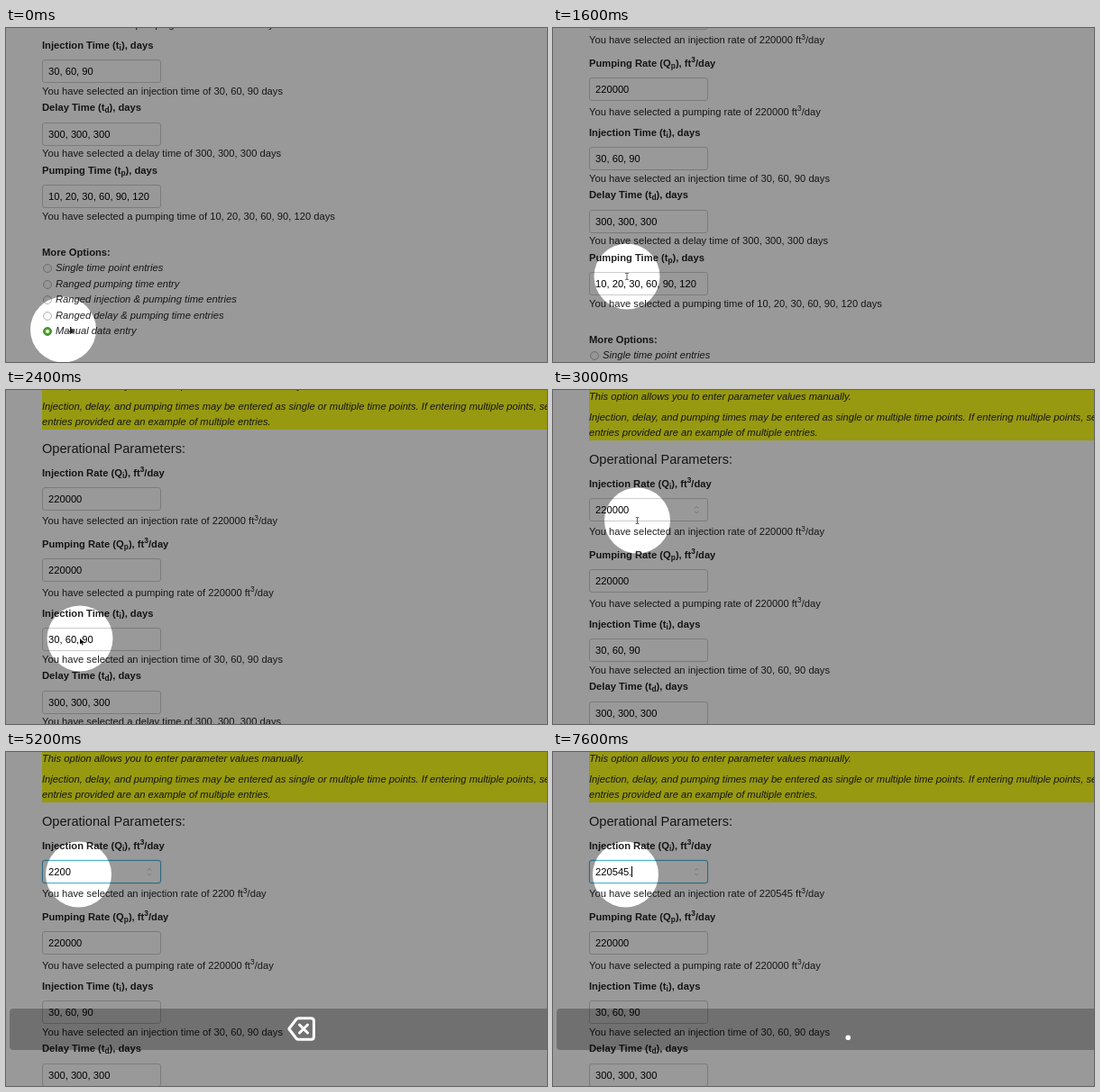
Animation of 600 by 371 pixels, one loop 8000 ms. Source, as an HTML page:

```html
<!DOCTYPE html>
<html lang="en">
<head>
<meta charset="utf-8">
<title>Parameter entry</title>
<style>
html, body { margin: 0; width: 100%; height: 100%; overflow: hidden; background: #fff; }
#stage {
  position: relative; width: 600px; height: 371px; overflow: hidden;
  font: 11.2px/16px "Liberation Sans", Arial, sans-serif; color: #222;
}
#stage div, #stage svg { position: absolute; }
#page { left: 0; top: 0; width: 600px; height: 600px; }
.row { left: 40px; white-space: nowrap; }
.bold { font-weight: bold; }
.em { font-style: italic; }
.head { font-size: 14.6px; }
.option { left: 55px; font-style: italic; }
sub, sup { font-size: 75%; line-height: 0; position: relative; vertical-align: baseline; }
sub { bottom: -.25em; }
sup { top: -.5em; }
#banner { left: 40px; top: -40px; width: 560px; height: 96px; background: #fbff1c; }
.field {
  left: 40px; width: 124px; height: 24px; padding-left: 6px; line-height: 24px;
  border: 1px solid #ccc; border-radius: 3px; background: #fff; color: #000; white-space: nowrap;
}
.field.focus { border-color: #48b2d4; box-shadow: 0 0 2px #9bd6ea; }
#caret { display: inline-block; width: 1px; height: 12px; background: #000; vertical-align: -2px; }
.radio {
  left: 41px; width: 8px; height: 8px; border: 1px solid #b5b5b5; border-radius: 50%;
  background: radial-gradient(#fff, #eee);
}
.radio.on { border-color: #3f8f25; background: radial-gradient(circle, #fff 1.6px, #48a02c 2.3px); }
#spot { width: 73px; height: 73px; border-radius: 50%; box-shadow: 0 0 0 900px rgba(0, 0, 0, .4); }
#bar { left: 4px; top: 285px; width: 610px; height: 46px; border-radius: 4px; background: rgba(0, 0, 0, .27); }
#art { left: 0; top: 0; }
#digit { font: 28px Lato, "Open Sans", sans-serif; text-anchor: middle; fill: #fff; }
</style>
</head>
<body>
<div id="stage">
  <div id="page"><div id="banner"></div></div>
  <div id="spot"></div>
  <div id="bar"></div>
  <svg id="art" width="600" height="371" fill="none">
    <g id="spinner" stroke="#777" stroke-width="1">
      <path d="M157.3 131.5l2-2.2 2 2.2M157.3 134.8l2 2.2 2-2.2"/>
    </g>
    <g id="pointer">
      <path id="hand" d="M-1-3h1.4v2.6l2.4.8v2.2l-1 1.6h-2.6l-1.8-2.6 1.6-.2z" fill="#222"/>
      <path id="arrow" d="M0 0v6.4l1.5-1.3 1 2.3 1.1-.5-1-2.2 2-.1z" fill="#000"/>
      <path id="ibeam" d="M-1.8-3.5h1.4l.4.5.4-.5h1.4M0-3v6M-1.8 3.5h1.4l.4-.5.4.5h1.4" stroke="#444" stroke-width=".9"/>
    </g>
    <g id="erase" stroke="#fff" stroke-width="3" stroke-linejoin="round" stroke-linecap="round">
      <path d="M313.8 307.5l8-10.5q1-1.3 2.6-1.3h14q3 0 3 3v17.6q0 3-3 3h-14q-1.6 0-2.6-1.3z"/>
      <path d="M325.5 303l9 9m0-9l-9 9"/>
    </g>
    <text id="digit" x="327" y="320"></text>
    <circle id="dot" cx="327.3" cy="317.3" r="2.8" fill="#fff"/>
  </svg>
</div>
<script>
const LOOP = 8000, STEP = 200;
const $ = id => document.getElementById(id);
const page = $('page');

function add(cls, y, html, half = 8) {
  const el = document.createElement('div');
  el.className = cls;
  el.style.top = y - half + 'px';
  el.innerHTML = html;
  return page.appendChild(el);
}
const row = (y, html, cls = '') => add('row ' + cls, y, html);
const field = (y, text) => add('field', y, text, 13);

// Page content, measured at the final scroll position
row(7, 'This option allows you to enter parameter values manually.', 'em');
row(30, 'Injection, delay, and pumping times may be entered as single or multiple time points. If entering multiple points, separate by commas.', 'em');
row(47, 'entries provided are an example of multiple entries.', 'em');
row(77, 'Operational Parameters:', 'head');

const rateText = (kind, n) => `You have selected ${kind} rate of ${n} ft<sup>3</sup>/day`;
row(103.5, 'Injection Rate (Q<sub>i</sub>), ft<sup>3</sup>/day', 'bold');
const rate = field(133, '220000');
const echo = row(157, '');
row(182.5, 'Pumping Rate (Q<sub>p</sub>), ft<sup>3</sup>/day', 'bold');
field(212, '220000');
row(236.5, rateText('a pumping', 220000));

[
  ['Injection', 'i', 'an injection', '30, 60, 90', 260],
  ['Delay', 'd', 'a delay', '300, 300, 300', 329.3],
  ['Pumping', 'p', 'a pumping', '10, 20, 30, 60, 90, 120', 399]
].forEach(([name, mark, kind, days, y]) => {
  row(y, `${name} Time (t<sub>${mark}</sub>), days`, 'bold');
  field(y + 29.3, days);
  row(y + 51, `You have selected ${kind} time of ${days} days`);
});

row(490, 'More Options:', 'bold');
['Single time point entries', 'Ranged pumping time entry', 'Ranged injection &amp; pumping time entries',
 'Ranged delay &amp; pumping time entries', 'Manual data entry'].forEach((label, i) => {
  const y = 507 + i * 17.5;
  add('radio' + (i === 4 ? ' on' : ''), y + 1, '', 5);
  row(y, label, 'option');
});

// Timelines: [time, value...]
const scroll = [[1000, -241], [1600, -144], [2400, -12], [2600, 0]];
const spot = [[0, 63.5, 335], [1000, 82, 276], [2600, 82, 276], [3000, 93.5, 145], [3600, 80.5, 136]];
const pointer = [[0, 'hand'], [200, 'arrow'], [1600, 'ibeam'], [1800, 'arrow'], [2800, 'ibeam'], [4800, '']];
const typed = [[0, '220000'], [5000, '22000'], [5200, '2200'], [5600, '220'],
  [6200, '2205'], [6600, '22054'], [7000, '220545'], [7600, '220545.']];
const echoed = [[0, '220000'], [5000, '22000'], [5200, '2200'], [5600, '220'],
  [6400, '2205'], [6800, '22054'], [7200, '220545']];
const keys = [[0, ''], [4800, 'erase'], [6400, '5'], [6800, '4'], [7200, '5'], [7600, '.']];

const held = (list, t) => list.filter(k => k[0] <= t).pop()[1];

function tween(list, t, n = 1) {
  const i = list.findIndex(k => k[0] > t);
  if (i < 0) return list[list.length - 1][n];
  if (i === 0) return list[0][n];
  const a = list[i - 1], b = list[i];
  return a[n] + (b[n] - a[n]) * (t - a[0]) / (b[0] - a[0]);
}
const show = (id, on) => { $(id).style.display = on ? '' : 'none'; };

function draw(t) {
  const x = tween(spot, t, 1), y = tween(spot, t, 2);
  page.style.transform = `translateY(${Math.round(tween(scroll, t))}px)`;
  $('spot').style.transform = `translate(${x - 36.5}px, ${y - 36.5}px)`;

  const shape = held(pointer, t);
  ['hand', 'arrow', 'ibeam'].forEach(id => show(id, id === shape));
  $('pointer').setAttribute('transform', `translate(${x + (shape === 'hand' ? 8.5 : 0)} ${y})`);

  rate.classList.toggle('focus', t >= 3600);
  rate.innerHTML = held(typed, t) + (t >= 6200 ? '<span id="caret"></span>' : '');
  echo.innerHTML = rateText('an injection', held(echoed, t));
  show('spinner', t >= 2800);

  const key = held(keys, t);
  show('bar', key);
  show('erase', key === 'erase');
  show('dot', key === '.');
  $('digit').textContent = /\d/.test(key) ? key : '';
}

let last = -1;
function tick() {
  const t = Math.floor(performance.now() % LOOP / STEP) * STEP;
  if (t !== last) draw(last = t);
  requestAnimationFrame(tick);
}
tick();
</script>
</body>
</html>
```
